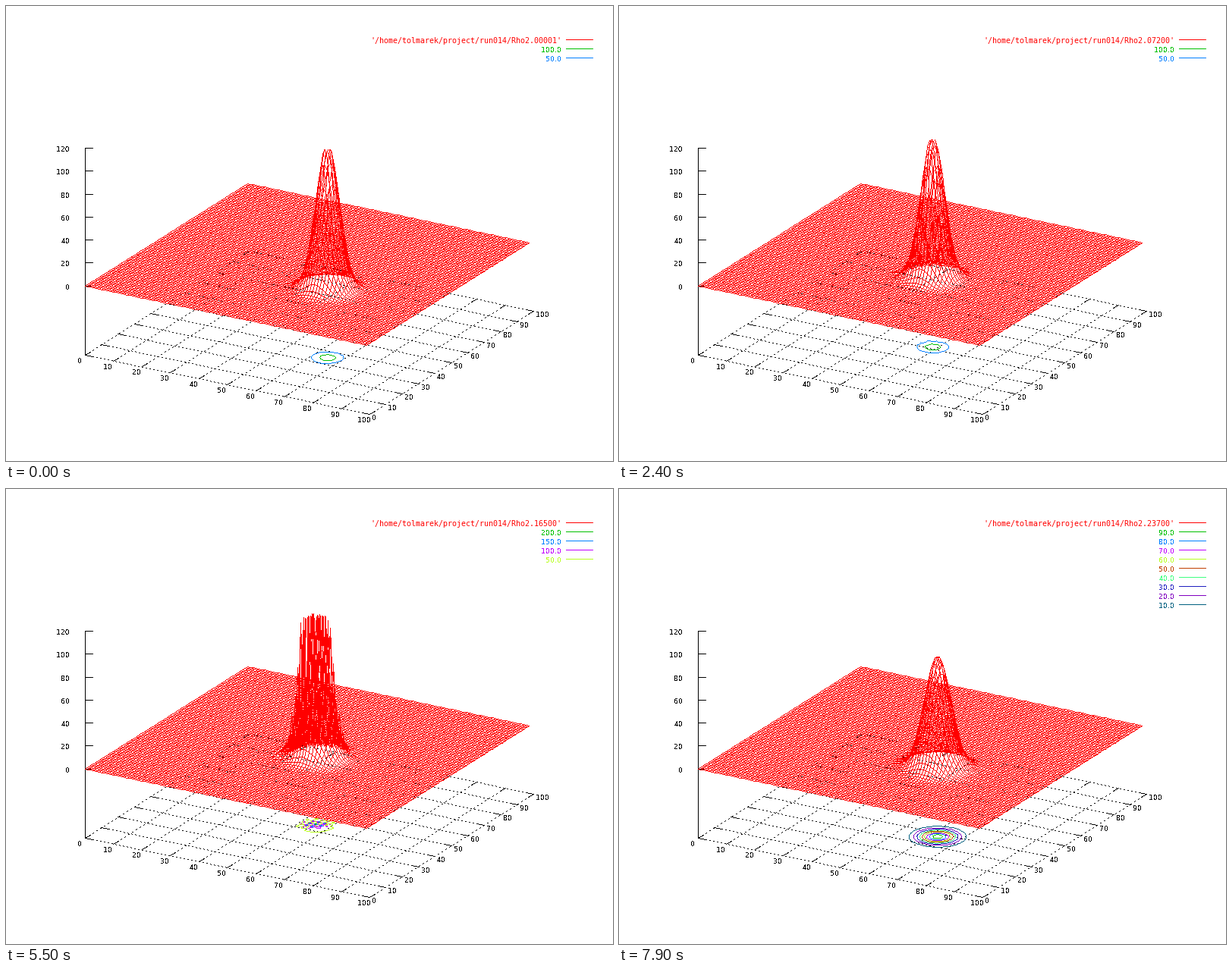
These frames come from a looping animation (800x600 px, 8000 ms). A matplotlib script:

```python
import numpy as np
import matplotlib.pyplot as plt
from matplotlib.animation import FuncAnimation

WIDTH, HEIGHT = 800, 600
FRAMES, INTERVAL = 80, 100
ZMIN, ZMAX = -60, 120
BLACK, RED = "#000000", "#ff0000"
PALETTE = ["#00c000", "#0080ff", "#c000ff", "#b8ff20", "#c04000",
           "#40ff80", "#2020c0", "#8000c0", "#006080"]
PX = 0.72  # one pixel in points at 100 dpi

plt.rcParams["text.antialiased"] = False

fig = plt.figure(figsize=(8, 6), dpi=100, facecolor="white")
ax = fig.add_axes([0, 0, 1, 1])
ax.axis("off")
backdrop = np.full((HEIGHT, WIDTH, 3), 255, np.uint8)
screen = ax.imshow(backdrop, extent=(0, WIDTH, HEIGHT, 0), aspect="auto",
                   interpolation="nearest")
ax.set_xlim(0, WIDTH)
ax.set_ylim(HEIGHT, 0)


def project(x, y, z):
    """View turned by 60 and 30 degrees, snapped to whole pixels."""
    x, y, z = x / 100 - 0.5, y / 100 - 0.5, (z - ZMIN) / (ZMAX - ZMIN) - 0.5
    s, c = 0.5, np.sqrt(0.75)
    across = x * c + y * s
    up = (y * c - x * s) * s + z * c
    return np.stack([400 + np.floor(433 * across),
                     294 - np.floor(315 * up)], axis=-1)


def rgb(color):
    return [int(color[i:i + 2], 16) for i in (1, 3, 5)]


def paint(img, start, end, color, dash=None):
    """Draw hard one-pixel lines, optionally dashed as (on, period)."""
    start, end = (np.reshape(p, (-1, 2)) for p in (start, end))
    ok = np.isfinite(start + end).all(axis=1)
    a = np.rint(start[ok]).astype(int)
    d = np.rint(end[ok]).astype(int) - a
    steps = np.abs(d).max(axis=1)
    count = steps + 1
    line = np.repeat(np.arange(len(a)), count)
    k = np.arange(count.sum()) - np.repeat(np.cumsum(count) - count, count)
    frac = k / np.maximum(steps, 1)[line]
    pts = a[line] + np.floor(d[line] * frac[:, None] + 0.5).astype(int)
    if dash:
        pts = pts[k % dash[1] < dash[0]]
    img[pts[:, 1], pts[:, 0]] = rgb(color)


def label(x, y, text, ha="center", color=BLACK):
    return ax.text(x, y + 4, text, ha=ha, va="baseline", color=color,
                   family="DejaVu Sans", size=9.43 * PX)


def draw_axes():
    def floor(x, y):
        return project(x, y, ZMIN)

    along_x, along_y = np.array([10, 2]), np.array([7, -4])
    ticks = []
    for v in range(0, 101, 10):
        front, back = floor(v, 0), floor(v, 100)
        left, right = floor(0, v), floor(100, v)
        paint(backdrop, [front, left], [back, right], BLACK, dash=(2, 5))
        ticks += [(front, along_y), (back, -along_y),
                  (left, along_x), (right, -along_x)]
        label(front[0] - 7, front[1] + 7, str(v))
        label(right[0] + 3, right[1] + 4, str(v), "left")
    for v in range(0, ZMAX + 1, 20):
        p = project(0, 0, v)
        ticks.append((p, np.array([10, 0])))
        label(84, p[1] + 1, str(v), "right")
    for p, step in ticks:
        paint(backdrop, p, p + step, BLACK)
    paint(backdrop, project(0, 0, ZMIN), project(0, 0, ZMAX), BLACK)


X, Y = np.meshgrid(np.arange(100.0), np.arange(100.0))


def density(t):
    """Wave packet that runs to a wall, interferes there and returns."""
    d = 12.3 - np.hypot(0.278 * (t - 44), 1.7)
    dx, dy = X - 65 + d, Y - 35 - d
    peak = 127 / (1 + (t / 143) ** 2)
    packet = peak * np.exp(-(dx**2 + dy**2) * peak / 3230)
    edge = 0.6 * abs(t - 44.6) - 6.1
    depth = (dx - dy) / np.sqrt(2) + edge
    c = 0.72 / (1 + np.exp(depth / 1.2))
    return packet * (1 + c * np.cos(3.05 * (X - 55))) * (1 + c * np.cos(3.05 * (Y - 45)))


def paint_rows(img, *xyz):
    """Draw every row of the mesh, cut where it rises above ZMAX."""
    p = np.stack(xyz, axis=-1)
    a, b = p[:, :-1], p[:, 1:]
    za, zb = a[..., 2:], b[..., 2:]
    cut = a + (ZMAX - za) / np.where(za == zb, 1, zb - za) * (b - a)
    hidden = (za > ZMAX) & (zb > ZMAX)
    start = np.where(hidden, np.nan, np.where(za > ZMAX, cut, a))
    end = np.where(hidden, np.nan, np.where(zb > ZMAX, cut, b))
    paint(img, project(*np.moveaxis(start, -1, 0)),
          project(*np.moveaxis(end, -1, 0)), RED)


def contour_levels(top):
    step = 10 if top < 100 else 20 if top < 120 else 50 if top < 300 else 100
    return np.arange(step, top, step)[:len(PALETTE)]


def paint_contours(img, z, levels):
    rings = ax.contour(X, Y, z, levels=levels)
    for segs, color in zip(rings.allsegs, PALETTE[:len(levels)][::-1]):
        for seg in segs:
            pts = project(seg[:, 0], seg[:, 1], ZMIN)
            paint(img, pts[:-1], pts[1:], color)
    rings.remove()


def paint_key(img, row, color):
    y = 44 + 12 * row
    paint(img, (738, y), (773, y), color)


draw_axes()
paint_key(backdrop, 0, RED)
title = ax.text(732, 49, "", ha="right", va="baseline", color=RED,
                family="DejaVu Sans Mono", size=10 * PX, antialiased=True)
keys = [label(732, 45 + 12 * n, "", "right", color)
        for n, color in enumerate(PALETTE, 1)]


def draw(i):
    z = density(i)
    levels = contour_levels(z.max())
    img = backdrop.copy()
    paint_rows(img, X, Y, z)
    paint_rows(img, X.T, Y.T, z.T)
    paint_contours(img, z, levels)

    title.set_text(f"'/home/tolmarek/project/run014/Rho2.{max(1, 300 * i):05d}'")
    for n, text in enumerate(keys):
        shown = n < len(levels)
        text.set_text(str(levels[-1 - n]) if shown else "")
        if shown:
            paint_key(img, n + 1, PALETTE[n])
    screen.set_data(img)
    return []


anim = FuncAnimation(fig, draw, frames=FRAMES, interval=INTERVAL,
                     init_func=lambda: [], repeat=True, repeat_delay=0)
plt.show()
```
